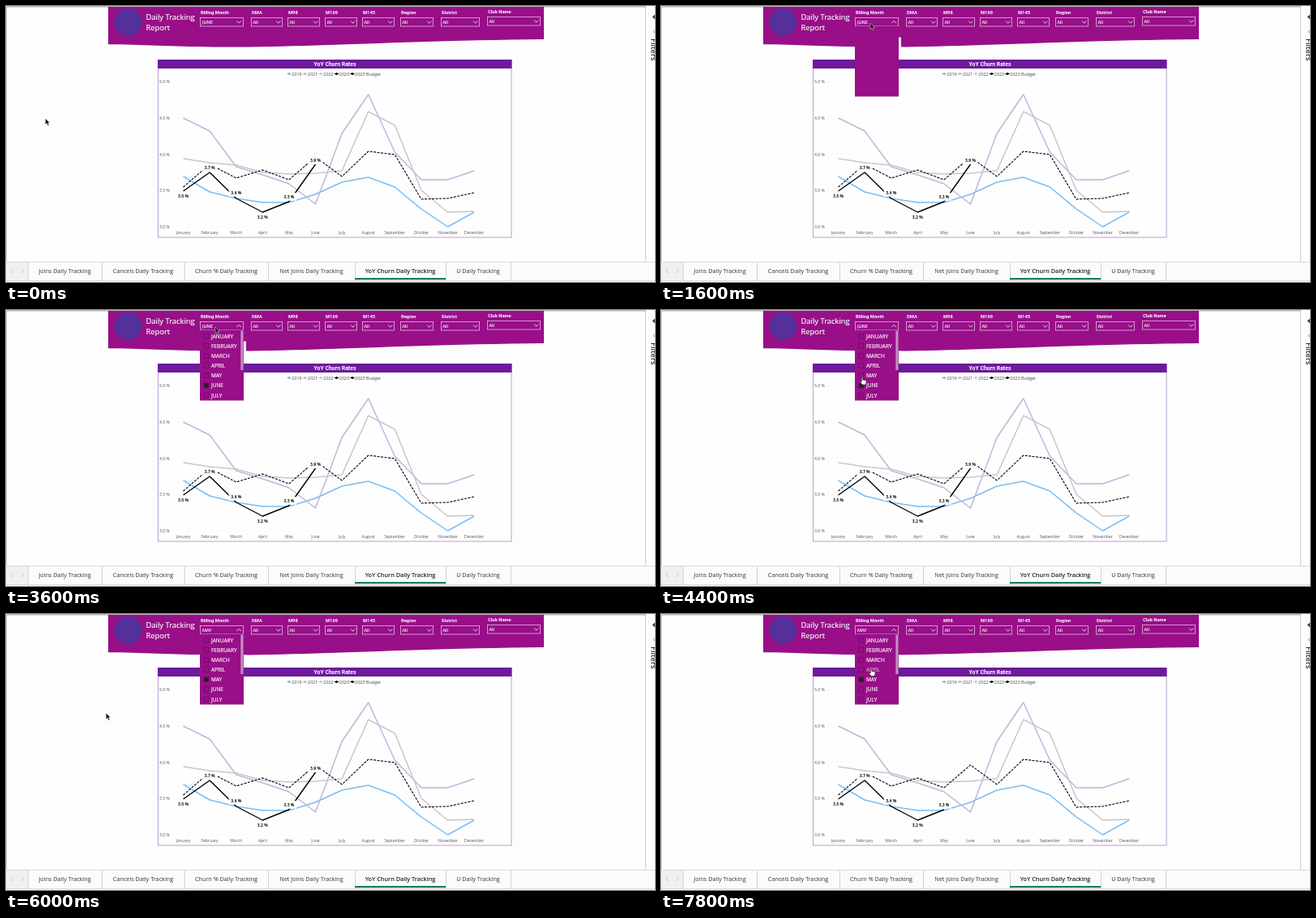
Recreate the animation shown at these times as an HTML page. Size 800x340 px, loop 8 s.

```html
<!DOCTYPE html>
<html lang="en">
<head>
<meta charset="utf-8">
<title>Daily Tracking Report</title>
<style>
  html, body { margin: 0; width: 100%; height: 100%; overflow: hidden; background: #fdfdfd; }
  svg { display: block; width: 800px; height: 340px; font-family: "Open Sans", "Noto Sans", sans-serif; }
  .din { font-family: Roboto, Inter, sans-serif; font-weight: 700; }
  .bright { stroke: currentColor; color: #fff; stroke-width: .15px; }
</style>
</head>
<body>
<svg id="stage" viewBox="0 0 800 340"></svg>
<script>
const stage = document.getElementById('stage');
const PURPLE = '#980f88';
const LOOP = 8000, TICK = 200;

function add(parent, tag, attrs = {}, content) {
  const el = document.createElementNS('http://www.w3.org/2000/svg', tag);
  for (const key in attrs) el.setAttribute(key, attrs[key]);
  if (content !== undefined) el.textContent = content;
  return parent.appendChild(el);
}
const group = (parent = stage) => add(parent, 'g');
const rect = (p, x, y, width, height, fill, more) => add(p, 'rect', { x, y, width, height, fill, ...more });
const path = (p, d, stroke, width = 1, more) =>
  add(p, 'path', { d, fill: 'none', stroke, 'stroke-width': width, ...more });
const text = (p, x, y, size, fill, content, more) =>
  add(p, 'text', { x, y, 'font-size': size, fill, ...more }, content);
const centred = { 'text-anchor': 'middle' };
const bright = { class: 'bright' };
const show = (el, on) => el.setAttribute('visibility', on ? 'visible' : 'hidden');

function drawWindow() {
  rect(stage, 0, 0, 800, 340, '#fdfdfd');
  path(stage, 'M0 .8H789', '#a9a9ab', 1.2);
  path(stage, 'M.5 0V315', '#c8c8c8');
  path(stage, 'M788.5 1V315', '#d2d2d2');
  text(stage, 0, 0, 9.2, '#3b2a22', 'Filters', { transform: 'translate(794.5 40) rotate(90)', 'font-weight': 600 });
  add(stage, 'path', { d: 'M800 10.5l-3.5 3 3.5 3z', fill: '#444' });
  path(stage, 'M800 29.5l-2 2 2 2', '#8a70a8');
}

function drawBanner() {
  add(stage, 'path', { d: 'M126 1H663V41C480 43 380 50.5 270 50.5C210 50.5 170 47.5 126 47.3Z', fill: PURPLE });
  add(stage, 'circle', { cx: 150.5, cy: 20, r: 17, fill: '#55309a' });
  text(stage, 172.5, 17, 9.4, '#fff', 'Daily Tracking', bright);
  text(stage, 172.5, 29.5, 9.4, '#fff', 'Report', bright);
  const slicers = [['Billing Month', 239, 293], ['DMA', 302, 341], ['M98', 347, 387], ['M169', 393, 433],
    ['M145', 439, 479], ['Region', 486, 527], ['District', 536, 584], ['Club Name', 593, 659]];
  slicers.forEach(([label, left, right], i) => {
    const top = i === 7 ? 13.5 : 14.5;
    text(stage, left + 1, top - 4.7, 5.8, '#fff', label, { class: 'din' });
    rect(stage, left + .5, top, right - left - 1, 10.5, 'none', { stroke: '#e3b9de', 'stroke-width': .8 });
    if (i) {
      text(stage, left + 2.5, top + 7.5, 5.6, '#fff', 'All', bright);
      path(stage, `M${right - 8} ${top + 4}l2.7 2.7 2.7-2.7`, '#fff', .8);
    }
  });
}

const MONTHS = ['January', 'February', 'March', 'April', 'May', 'June', 'July',
  'August', 'September', 'October', 'November', 'December'];
const monthX = i => 218.5 + 32.6 * i;
const linePath = ys => 'M' + ys.map((y, i) => `${monthX(i)} ${y}`).join('L');

function drawChart() {
  rect(stage, 187.5, 66.5, 435.5, 218.5, '#fefefe', { stroke: '#b595ca', 'stroke-width': .9 });
  rect(stage, 187, 66, 436.5, 11, '#6d1b9b');
  text(stage, 405.5, 74.2, 6.9, '#fff', 'YoY Churn Rates', { class: 'din', ...centred });

  const legend = [['2019', 349, '#6fbaf8'], ['2021', 368.5, '#bbb0dc'], ['2022', 388, '#c6c3c9'],
    ['2023', 407.5, '#000'], ['2023 Budget', 427, '#000']];
  for (const [label, x, color] of legend) {
    path(stage, `M${x - 2.7} 83.5h5.4`, color);
    add(stage, 'circle', { cx: x, cy: 83.5, r: 1.6, fill: color });
    text(stage, x + 3.3, 85.6, 5.4, '#444', label);
  }

  for (let i = 0; i < 5; i++) {
    const y = 93 + 44.8 * i;
    path(stage, `M206 ${y}H590`, '#ececec', .6, { 'stroke-dasharray': '1 2' });
    text(stage, 189, y + 2, 5.1, '#555', (5 - i / 2).toFixed(1) + ' %');
  }
  MONTHS.forEach((m, i) => text(stage, monthX(i), 281.3, 5, '#555', m, centred));

  const curve = (ys, color, width, more) =>
    path(stage, linePath(ys), color, width, { 'stroke-linejoin': 'round', ...more });
  curve([210, 229, 237, 242, 242, 232, 217, 211, 223, 250, 272, 254], '#78bef8', 1.5);
  curve([138, 154, 198, 208, 219, 244, 157, 109, 180, 214, 214, 203], '#bfb5de', 1.5);
  curve([188, 193, 196, 205, 207, 206, 203, 130, 147, 227, 254, 253], '#c9c6cb', 1.5);
  curve([223, 195, 212, 202, 214, 186, 210, 179, 183, 238, 237, 230], '#000', 1.1, { 'stroke-dasharray': '3 1.5' });
  curve([228, 205, 237, 254, 241], '#000', 1.4);

  const june = group();
  path(june, `M${monthX(4)} 241L${monthX(5)} 195`, '#000', 1.4);
  const labels = [['3.5 %', 234], ['3.7 %', 199], ['3.4 %', 230], ['3.2 %', 260.5], ['3.3 %', 235], ['3.9 %', 190]];
  labels.forEach(([label, y], i) => {
    const p = i === 5 ? june : stage;
    rect(p, monthX(i) - 9, y - 4.8, 18, 9.6, '#fefefe');
    text(p, monthX(i), y + 1.9, 5, '#111', label, { 'font-weight': 700, ...centred });
  });
  return june;
}

function drawTabs() {
  rect(stage, 0, 315, 800, 25, '#fbfbfb');
  rect(stage, 0, 316, 27, 22, '#f0f0f0');
  path(stage, 'M0 315.5H800M0 338.5H800', '#dadada');
  path(stage, 'M8.5 324l-2.5 2.5 2.5 2.5M19 324l2.5 2.5-2.5 2.5', '#b5b5b5', .8);
  const edges = [27, 118, 220, 323, 430, 542, 622];
  path(stage, edges.map(x => `M${x + .5} 316V338`).join(''), '#d4d4d4');
  ['Joins', 'Cancels', 'Churn %', 'Net Joins', 'YoY Churn', 'U'].forEach((name, i) => {
    const active = i === 4;
    text(stage, (edges[i] + edges[i + 1]) / 2, 329.2, 7.25, active ? '#222' : '#333', name + ' Daily Tracking',
      { 'font-weight': active ? 600 : 400, ...centred });
  });
  rect(stage, 430, 335, 112, 2.2, '#177a5c');
}

function drawToolbar() {
  const bar = group();
  for (const x of [245, 263, 280]) rect(bar, x, 38.5, 16, 14, '#eeecef');
  path(bar, 'M249.5 43.5h7M251 46h4M252.2 48.5h1.6', '#555', .9);
  path(bar, 'M270 43h-3v6h6v-3M271 43h3v3M274 43l-4 4', '#555', .8);
  for (const x of [285, 288, 291]) add(bar, 'circle', { cx: x, cy: 46, r: .8, fill: '#444' });
  return bar;
}

function drawMenu() {
  const menu = group();
  rect(menu, 239, 25, 54, 86.5, PURPLE);
  const list = group(menu);
  const rows = MONTHS.slice(0, 7).map((m, i) => {
    const y = 32.2 + 12.15 * i;
    return {
      box: rect(list, 244, y - 2.9, 5.8, 5.8, 'none', { stroke: '#6a0a60', 'stroke-width': .8 }),
      label: text(list, 253, y + 2.4, 6.5, '#fff', m.toUpperCase(), bright)
    };
  });
  rect(list, 289.3, 25.5, 3.2, 48.5, '#c38dbf');
  return { menu, list, rows };
}

function drawCursor() {
  const cursor = group();
  const arrow = add(cursor, 'path', {
    d: 'M0 0V7.6L1.8 6L3.1 9L4.5 8.4L3.2 5.5H5.5Z', fill: '#111', stroke: '#fff', 'stroke-width': .4 });
  const hand = add(cursor, 'path', {
    d: 'M-.8 .8Q0-.6 .8 .8V3.4L4.6 4.2Q5.4 4.5 5.2 5.6L4.4 9.6H0L-2.4 6.2Q-2.4 5-.8 5.8Z',
    fill: '#fff', stroke: '#222', 'stroke-width': .7 });
  return { cursor, arrow, hand };
}

drawWindow();
drawBanner();
const june = drawChart();
drawTabs();
const toolbar = drawToolbar();
const { menu, list, rows } = drawMenu();
const monthValue = text(stage, 242, 22, 5.6, '#fff', 'JUNE', bright);
const chevron = path(stage, '', '#fff', .8);
const { cursor, arrow, hand } = drawCursor();

// time, x, y of the pointer tip
const TRACK = [[0, 48.5, 138.5], [200, 48.5, 138.5], [1000, 258, 26], [1200, 258, 26], [1400, 258, 21],
  [3600, 258, 21], [4200, 248, 82.5], [5000, 248, 82.5], [5800, 123.3, 122], [7200, 123.3, 122],
  [7800, 259, 67], [8000, 259, 67]];

function pointerAt(t) {
  const i = TRACK.findIndex(k => k[0] > t);
  const [t0, x0, y0] = TRACK[i - 1], [t1, x1, y1] = TRACK[i];
  const u = (t - t0) / (t1 - t0), s = u * u * (3 - 2 * u);
  return [x0 + (x1 - x0) * s, y0 + (y1 - y0) * s];
}

function render(t) {
  const open = t >= 1400, listed = t >= 2000;
  const selected = t >= 5000 ? 4 : 5;
  const [x, y] = pointerAt(t);
  const overList = listed && x > 239 && x < 293 && y > 26 && y < 112;

  // the open menu covers all but the right edge of the toolbar
  show(toolbar, t >= 1000 && t < 3800);
  show(menu, open);
  list.setAttribute('display', listed ? 'inline' : 'none');
  show(june, t < 6800);
  monthValue.textContent = MONTHS[selected].toUpperCase();
  chevron.setAttribute('d', open ? 'M284.5 21l2.7-2.7 2.7 2.7' : 'M284.5 18.3l2.7 2.7 2.7-2.7');
  rows.forEach(({ box, label }, i) => {
    box.setAttribute('fill', i === selected ? '#241f24' : 'none');
    label.setAttribute('opacity', overList && i === 3 && Math.abs(y - 68) < 6 ? .6 : 1);
  });
  cursor.setAttribute('transform', `translate(${x} ${y})`);
  show(arrow, !overList);
  show(hand, overList);
}

const start = performance.now();
function loop() {
  const t = (performance.now() - start) % LOOP;
  render(Math.floor(t / TICK) * TICK);
  requestAnimationFrame(loop);
}
loop();
</script>
</body>
</html>
```
